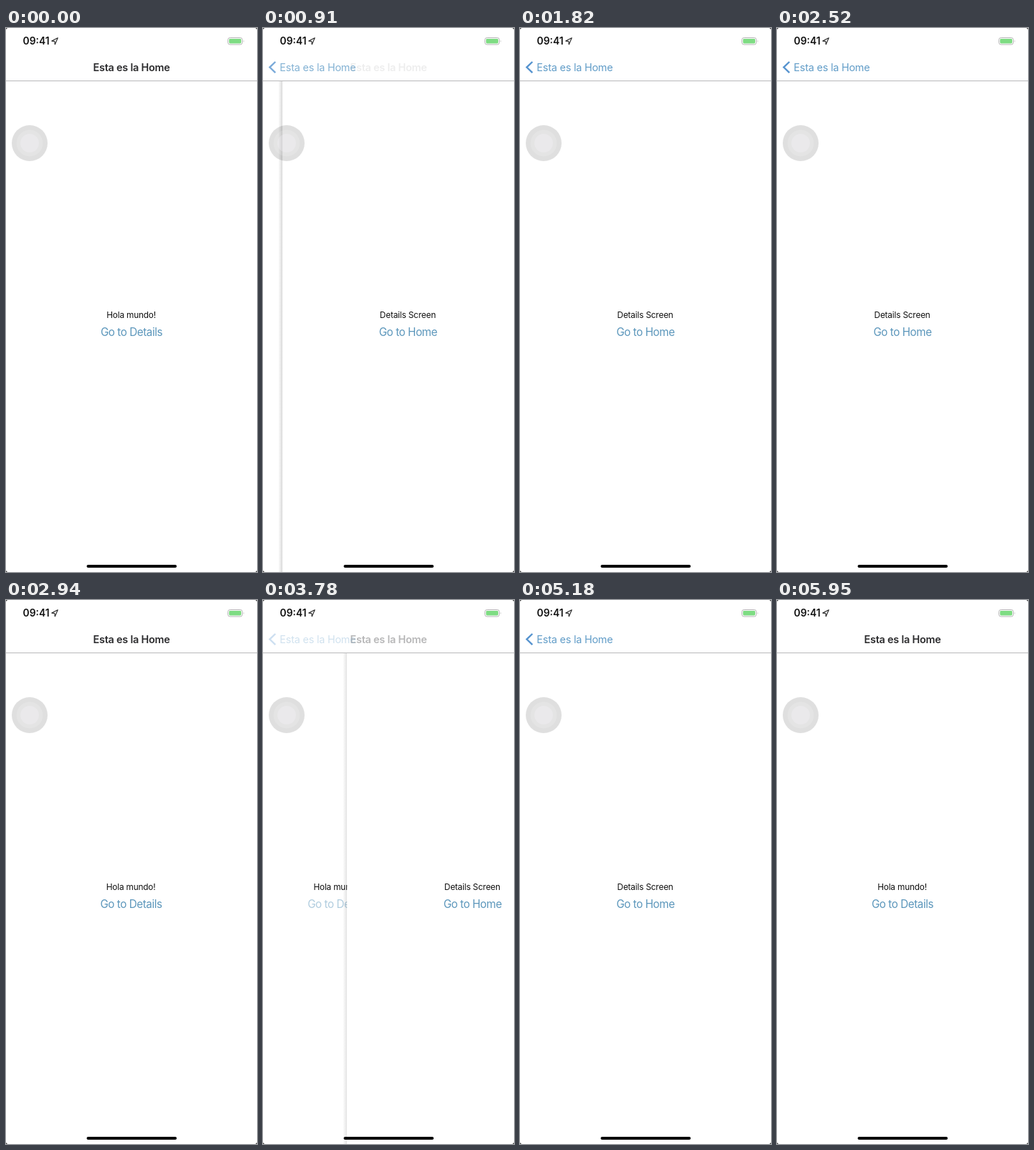
Write an HTML page that moves like this. It is 350 px wide and 756 px high and loops after 6090 ms.

```html
<!DOCTYPE html>
<html lang="es">
<head>
<meta charset="utf-8">
<title>Stack navigation</title>
<style>
  html, body { margin: 0; width: 100%; height: 100%; overflow: hidden; background: #fff; }
  svg { display: block; width: 350px; height: 756px; font-family: Inter, Roboto, sans-serif; }
  .middle { text-anchor: middle; }
  .body { font-size: 11.8px; letter-spacing: -.17px; fill: #111; }
  .link { font-size: 15.2px; letter-spacing: -.43px; fill: #5b96bb; }
  .title { font-size: 14.4px; font-weight: 600; letter-spacing: -.22px; fill: #2b2b2d; }
  .back { font-size: 14.4px; letter-spacing: -.2px; fill: #629dc8; }
  .clock { font-size: 13.8px; font-weight: 600; fill: #111; }
</style>
</head>
<body>
<svg viewBox="0 0 350 756">
  <defs>
    <linearGradient id="edge">
      <stop offset="0" stop-opacity="0"/>
      <stop offset="1" stop-opacity=".17"/>
    </linearGradient>
  </defs>

  <rect width="350" height="756" fill="#fff"/>
  <g id="home">
    <text class="body middle" x="174.6" y="403">Hola mundo!</text>
    <text id="homeLink" class="link middle" x="175" y="428">Go to Details</text>
  </g>

  <g id="details">
    <rect id="shadow" x="-6" y="74" width="6" height="682" fill="url(#edge)"/>
    <rect width="350" height="756" fill="#fff"/>
    <text class="body middle" x="174.6" y="403">Details Screen</text>
    <text class="link middle" x="175" y="428">Go to Home</text>
  </g>

  <rect width="350" height="73" fill="#fff"/>
  <rect y="73" width="350" height="1" fill="#b9b9bb"/>
  <text id="title" class="title middle" x="175" y="60">Esta es la Home</text>
  <g id="back">
    <path d="M17.3 47L9.4 54.6L17.3 62.2" fill="none" stroke="#5794cf" stroke-width="2.4"/>
    <text class="back" x="23.3" y="60">Esta es la Home</text>
  </g>

  <text class="clock" x="23.6" y="23">09:41</text>
  <path d="M72.2 13.8L63.8 18.1L67.8 18.5L68.3 22.9Z" fill="none" stroke="#222" stroke-width="1.1" stroke-linejoin="round"/>
  <rect x="309.5" y="13.5" width="20" height="9.5" rx="2.8" fill="none" stroke="#b5b5b5"/>
  <rect x="311" y="15" width="17" height="6.5" rx="1.4" fill="#7edc83"/>
  <path d="M331 16.7q1.4 1.5 0 3z" fill="#aaa"/>

  <circle cx="33" cy="160" r="25" fill="#000" fill-opacity=".125"/>
  <circle cx="33" cy="160" r="18.5" fill="#fff" fill-opacity=".14"/>
  <circle cx="33" cy="160" r="13" fill="#fbf8ff" fill-opacity=".25"/>
  <rect x="112.5" y="746" width="125.5" height="4" rx="2" fill="#000"/>
  <path d="M0 0h3Q0 0 0 3zM350 0h-3q3 0 3 3zM0 756h3q-3 0-3-3zM350 756h-3q3 0 3-3z" fill="#111"/>
</svg>
<script>
  const LOOP = 6090, STEP = 70, WIDTH = 350;
  const PUSHES = [680, 3655], POPS = [2533, 5383];
  const OMEGA = Math.sqrt(1000 / 3);
  const $ = id => document.getElementById(id);
  const [home, homeLink, details, shadow, title, back] =
    ['home', 'homeLink', 'details', 'shadow', 'title', 'back'].map($);

  const clamp = v => Math.min(1, Math.max(0, v));
  const ease = v => v < .5 ? 2 * v * v : 1 - 2 * (1 - v) ** 2;

  // Critically damped spring from 0 to 1.
  function spring(ms) {
    const x = OMEGA * Math.max(0, ms) / 1000;
    return 1 - Math.exp(-x) * (1 + x);
  }

  // Button dims on touch and recovers after release.
  function pressed(ms) {
    return ease(clamp(ms / 150)) - ease(clamp((ms - 150) / 250));
  }

  const sum = (starts, fn) => starts.reduce((total, start) => total + fn(start), 0);

  function draw(time) {
    const t = Math.floor((time % LOOP) / STEP + 1e-6) * STEP;
    const progress = clamp(sum(PUSHES, s => spring(t - s)) - sum(POPS, s => spring(t - s)));
    home.setAttribute('transform', `translate(${-.3 * WIDTH * progress} 0)`);
    homeLink.setAttribute('opacity', 1 - .8 * sum(PUSHES, s => pressed(t - s + 130)));
    details.setAttribute('transform', `translate(${WIDTH * (1 - progress)} 0)`);
    shadow.setAttribute('opacity', progress);
    title.setAttribute('opacity', 1 - progress);
    back.setAttribute('opacity', progress ** 3);
  }

  const origin = performance.now();
  function tick() {
    draw(performance.now() - origin);
    requestAnimationFrame(tick);
  }
  tick();
</script>
</body>
</html>
```
